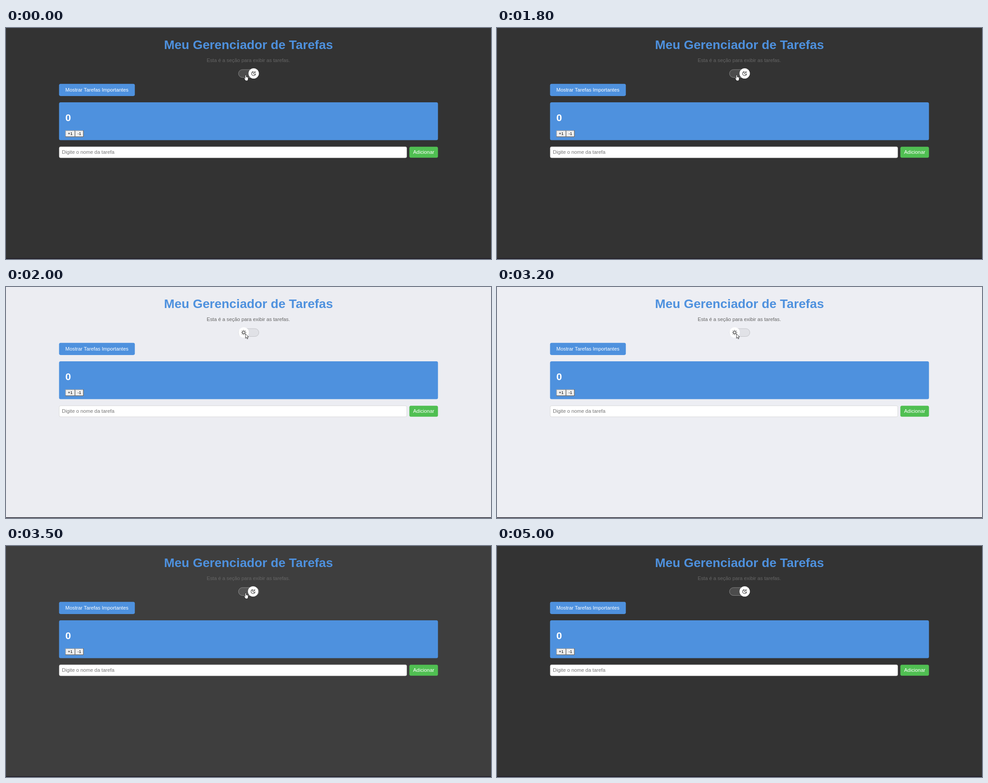
These frames come from a looping animation (1085x516 px, 5100 ms). An HTML page:

```html
<!DOCTYPE html>
<html lang="pt-BR">
<head>
<meta charset="utf-8">
<title>Meu Gerenciador de Tarefas</title>
<style>
  html, body { margin: 0; width: 100%; height: 100%; overflow: hidden; background: #333; }
  svg { display: block; width: 100%; height: 100%; }
  text { font: 16px "Liberation Sans", Arial, sans-serif; white-space: pre; }
  .title { font-size: 40px; font-weight: bold; fill: #4e91de; }
  .count { font-size: 32px; font-weight: bold; }
  .small { font-size: 13.333px; }
  .blue { fill: #4e91de; }
  .white { fill: #fff; }
  .mid { text-anchor: middle; }
  .icon { fill: none; stroke: #2b2b2b; stroke-width: 1.5; stroke-linecap: round; stroke-linejoin: round; }
  .cursor { fill: #fff; stroke: #111; stroke-width: .8; stroke-linejoin: round; }
</style>
</head>
<body>
<svg viewBox="0 0 1085 516" xmlns="http://www.w3.org/2000/svg">
  <rect id="page" width="1085" height="516"/>
  <rect y="514.5" width="1085" height="1.5" fill="#1d1b27"/>

  <!-- page laid out at 1536 px wide -->
  <g transform="scale(.7064)">
    <text class="title mid" x="768" y="67">Meu Gerenciador de Tarefas</text>
    <text class="mid" x="767.5" y="107" fill="#666">Esta é a seção para exibir as tarefas.</text>

    <rect id="track" x="736.3" y="131.5" width="64.5" height="25" rx="12.5" stroke-width="1.4"/>
    <g id="knob">
      <circle class="white" r="16.3"/>
      <g id="sun" class="icon">
        <circle r="4"/>
        <path id="rays"/>
      </g>
      <g id="moon" class="icon">
        <path d="M-1.5-6A6.5 6.5 0 1 0 6.3 2A6 6 0 0 1-1.5-6Z"/>
        <path d="M3.3-5.6V-1.8M1.4-3.7H5.2M6.4-6.2v.1M6.6-1.2v.1"/>
      </g>
    </g>

    <rect class="blue" x="168" y="176.6" width="240" height="38.4" rx="5"/>
    <text class="white" x="188" y="201">Mostrar Tarefas Importantes</text>

    <rect class="blue" x="168" y="235" width="1200" height="119.6" rx="5"/>
    <text class="count white" x="188" y="295">0</text>
    <g id="steps"></g>

    <rect x="168.5" y="375.5" width="1100.6" height="35" rx="4.5" fill="#fff" stroke="#ccc"/>
    <text x="177" y="397.8" fill="#757575">Digite o nome da tarefa</text>
    <rect x="1277.4" y="375.4" width="90.6" height="34.8" rx="5" fill="#50bf52"/>
    <text class="white" x="1289.4" y="397.8">Adicionar</text>
  </g>

  <g id="pointer" class="cursor">
    <path id="arrow" d="M0 0V10.2L2.3 8L3.9 11.6L5.5 10.9L3.9 7.4H7Z"/>
    <path id="hand" d="M-.8 1.6Q-.8 .3 .4 .3T1.6 1.6V4.9Q2.9 4.3 3.3 5.3Q4.4 4.8 4.8 5.8Q6.1 5.5 6.1 7V9.6Q6.1 11.2 5 12.3V13.5H-.2V12.4L-2.9 8.6Q-3.2 7.4-2.2 7.2Q-1.4 7.2-.8 8.2Z"/>
  </g>
</svg>
<script>
const $ = id => document.getElementById(id);
const LOOP = 5100, TICK = 100, FADE = 200;
const TO_LIGHT = 1822, TO_DARK = 3359, LEAVE = 4000;
const DARK = [51, 51, 51], LIGHT = [237, 238, 243];
const KNOB_DARK = 784.3, KNOB_LIGHT = 752.6;

const clamp = v => Math.min(1, Math.max(0, v));
const mix = (a, b, k) => a + (b - a) * k;
const show = (id, on) => $(id).setAttribute('display', on ? 'inline' : 'none');

// CSS "ease": cubic-bezier(.25, .1, .25, 1)
function ease(p) {
  if (p <= 0 || p >= 1) return clamp(p);
  const curve = (a, b, s) => 3 * a * s * (1 - s) ** 2 + 3 * b * s * s * (1 - s) + s ** 3;
  let lo = 0, hi = 1;
  for (let i = 0; i < 24; i++) {
    const s = (lo + hi) / 2;
    if (curve(.25, .25, s) < p) lo = s; else hi = s;
  }
  return curve(.1, 1, lo);
}

function stepButton(x, width, label) {
  const top = 324, h = 20.6, r = x + width, b = top + h;
  return `<rect x="${x}" y="${top}" width="${width}" height="${h}" fill="#efefef"/>
    <path d="M${x + .6} ${b}V${top + .6}H${r}" fill="none" stroke="#858585" stroke-width="1.2"/>
    <path d="M${x} ${b - .7}H${r - .7}V${top}" fill="none" stroke="#333" stroke-width="1.4"/>
    <text class="small mid" x="${x + width / 2}" y="338.4">${label}</text>`;
}

function build() {
  $('steps').innerHTML = stepButton(188, 30.8, '+1') + stepButton(218.8, 27, '-1');
  let d = '';
  for (let i = 0; i < 8; i++) {
    const c = Math.cos(i * Math.PI / 4), s = Math.sin(i * Math.PI / 4);
    d += `M${6.2 * c} ${6.2 * s}L${7.4 * c} ${7.4 * s}`;
  }
  $('rays').setAttribute('d', d);
}

function draw(t) {
  const light = ease((t - TO_LIGHT) / FADE) - ease((t - TO_DARK) / FADE);
  const isLight = t >= TO_LIGHT && t < TO_DARK;
  const rgb = DARK.map((v, i) => Math.round(mix(v, LIGHT[i], light)));
  $('page').setAttribute('fill', `rgb(${rgb})`);

  const tint = isLight ? '0,0,0' : '255,255,255';
  $('track').setAttribute('fill', `rgba(${tint},${isLight ? .05 : .12})`);
  $('track').setAttribute('stroke', `rgba(${tint},${isLight ? .16 : .38})`);

  const x = mix(KNOB_DARK, KNOB_LIGHT, light);
  $('knob').setAttribute('transform', `translate(${x} 143.7)`);
  show('sun', isLight);
  show('moon', !isLight);

  // the pointer is a hand only over the bare track
  const away = Math.max(0, t - LEAVE) / 100;
  const y = 104.4 - 90 * away * away;
  const onTrack = light < .3 && y > 92;
  $('pointer').setAttribute('transform', `translate(535.7 ${y})`);
  show('hand', onTrack);
  show('arrow', !onTrack);
}

let start;
function loop(now) {
  start ??= now;
  const t = (now - start) % LOOP;
  draw(Math.floor(t / TICK + .001) * TICK);
  requestAnimationFrame(loop);
}

build();
draw(0);
requestAnimationFrame(loop);
</script>
</body>
</html>
```
